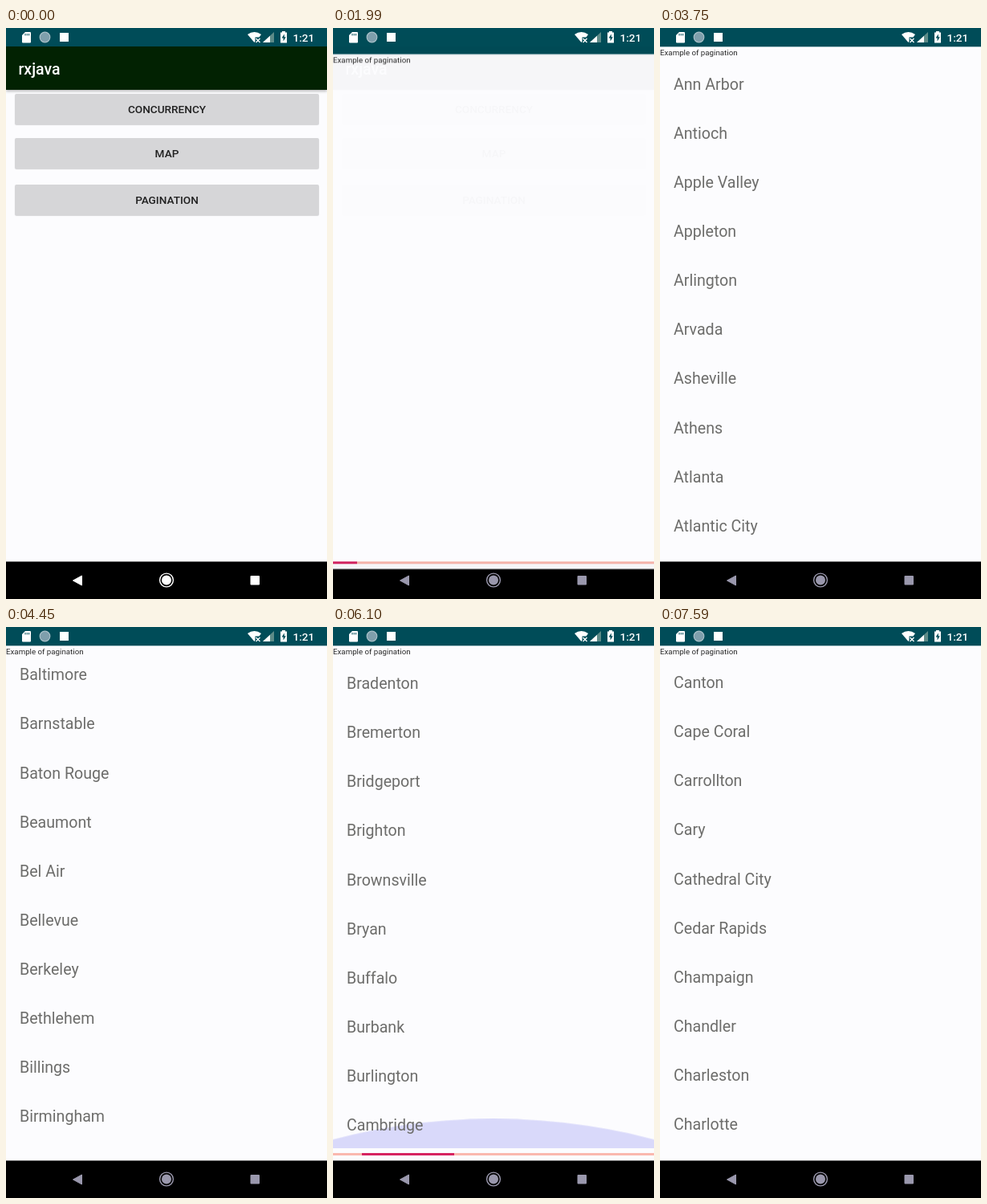
Recreate the animation shown at these times as an HTML page. Size 400x711 px, loop 8.47 s.

```html
<!DOCTYPE html>
<html lang="en">
<head>
<meta charset="utf-8">
<title>Pagination demo</title>
<style>
  html, body { margin: 0; width: 100%; height: 100%; overflow: hidden; background: #000; }
  body { font-family: Roboto, "Noto Sans", sans-serif; }
  .stage { position: relative; width: 400px; height: 711px; overflow: hidden; background: #000; }
  .stage div, .stage svg { position: absolute; }
  .page { left: 0; top: 0; width: 400px; height: 711px; background: #000; }
  .status { left: 0; top: 0; width: 400px; height: 23px; background: #004c58; }
  /* soft edges: the bars end between two pixels */
  .body { left: 0; top: 23px; width: 400px; height: 642px; background: #fcfcfe; overflow: hidden;
    box-shadow: inset 0 1px #a8c1c7, inset 0 -1px #707071; }

  .toolbar { left: 0; top: 23px; width: 400px; height: 54px; background: #022202; color: #fff;
    font: 500 19.5px/57px Roboto, sans-serif; text-indent: 15.5px; box-shadow: 0 2px 3px rgba(0,0,0,.25); }
  .btn { left: 11px; width: 379px; height: 38px; border-radius: 2px; background: #d6d6d8; color: #212121;
    font: 500 13.6px/39px Roboto, sans-serif; text-align: center; overflow: hidden;
    box-shadow: 0 1px 1px rgba(0,0,0,.16); }
  .ripple { left: -20px; top: -191px; width: 420px; height: 420px; border-radius: 50%;
    background: rgba(0,0,0,.13); transform: scale(0); animation: ripple 8.47s linear infinite; }

  .demo { opacity: 0; animation: rise 8.47s linear infinite, fade 8.47s linear infinite; }
  .label { left: 0; top: 2px; font-size: 9.73px; line-height: 11.4px; color: #2a2a2a; white-space: nowrap; }
  .view { left: 0; top: 13px; width: 400px; height: 613px; overflow: hidden;
    animation: load 8.47s step-end infinite; }
  .list { left: 17px; top: 3.6px; color: #6d6d6b; font-size: 19.6px; white-space: nowrap;
    animation: scroll 8.47s linear infinite; }
  .list div { position: static; height: 61.111px; line-height: 61.111px; }
  .glow { left: 0; top: 13px; overflow: hidden; }
  .glow ellipse { fill: #d5d5fa; fill-opacity: .9; transform-origin: 200px 613px; transform: scaleY(0);
    animation: glow 8.47s linear infinite; animation-delay: var(--at); }
  .track { left: 0; top: 632px; width: 400px; height: 3px; background: #fab8ae; overflow: hidden; opacity: 0;
    animation: show 8.47s step-end infinite; animation-delay: var(--at); }
  .track i { position: absolute; top: 0; height: 3px; background: #d62360;
    animation: sweep 8.47s linear infinite; animation-delay: var(--at); }

  .icons { left: 0; top: 0; }
  .nav { fill: #fff; stroke: #fff; animation: dim 8.47s step-end infinite; }
  .clock { font: 500 13.6px Roboto, sans-serif; }

  @keyframes ripple {
    0%, 19.36% { transform: scale(.05); opacity: 0; animation-timing-function: ease-out; }
    20.3% { opacity: 1; }
    22.9% { transform: scale(1); opacity: 1; }
    24.6%, 100% { transform: scale(1); opacity: 0; }
  }
  @keyframes rise {
    0%, 22.29% { transform: translateY(57px); animation-timing-function: cubic-bezier(.23,1,.32,1); }
    26.42%, 100% { transform: none; }
  }
  @keyframes fade {
    0%, 22.22% { opacity: 0; animation-timing-function: cubic-bezier(.215,.61,.355,1); }
    23.9%, 100% { opacity: 1; }
  }
  @keyframes load { 0% { visibility: hidden; } 27.42%, 100% { visibility: visible; } }
  @keyframes scroll {
    0%, 31.759% { transform: translateY(-2px); animation-timing-function: cubic-bezier(.4,.1,.7,.7); }
    35.419% { transform: translateY(-784.2px); animation-timing-function: cubic-bezier(.3,.45,.6,.9); }
    38.135%, 49.351% { transform: translateY(-1222.2px); animation-timing-function: cubic-bezier(.4,.1,.6,.85); }
    54.191%, 65.88% { transform: translateY(-2444.4px); animation-timing-function: cubic-bezier(.4,.1,.6,.85); }
    69.185%, 80.874% { transform: translateY(-3055.5px); animation-timing-function: cubic-bezier(.4,.1,.6,.85); }
    83.943%, 100% { transform: translateY(-3666.6px); }
  }
  @keyframes glow {
    0% { transform: scaleY(0); opacity: .5; }
    1.3% { transform: scaleY(.95); opacity: 1; }
    3.07% { transform: scaleY(1); opacity: 1; }
    3.542% { transform: scaleY(.68); opacity: .9; }
    5.667%, 100% { transform: scaleY(0); opacity: .4; }
  }
  @keyframes show { 0% { opacity: 1; } 5.19%, 100% { opacity: 0; } }
  @keyframes sweep {
    0% { left: -36px; width: 32px; }
    1.275% { left: -1px; width: 30px; }
    2.597% { left: 35px; width: 115px; }
    5.195%, 100% { left: 150px; width: 230px; }
  }
  @keyframes dim { 0% { fill: #fff; stroke: #fff; } 22.22%, 100% { fill: #9a98ad; stroke: #9a98ad; } }
</style>
</head>
<body>
<div class="stage">
  <div class="page">
    <div class="status"></div>
    <div class="body"></div>
    <div class="toolbar">rxjava</div>
    <div class="btn" style="top:82px">CONCURRENCY</div>
    <div class="btn" style="top:137px">MAP</div>
    <div class="btn" style="top:195px">PAGINATION<div class="ripple"></div></div>
  </div>

  <div class="page demo">
    <div class="status"></div>
    <div class="body">
      <div class="label">Example of pagination</div>
      <svg class="glow" id="glow" width="400" height="613"></svg>
      <div class="view"><div class="list" id="list"></div></div>
      <div id="bars"></div>
    </div>
  </div>

  <svg class="icons" width="400" height="711">
    <g fill="#fff">
      <path d="M24 5h6q1 0 1 1v11.500q0 1-1 1h-9q-1 0-1-1V9z"/>
      <path d="M24 7v2.500M26.300 7v2.500M28.600 7v2.500" stroke="#004c58"/>
      <circle cx="48.500" cy="11.500" r="6.300" fill="#7f9fac" stroke="#a9c0c8" stroke-width="1.200"/>
      <rect x="67" y="6" width="11" height="11"/>
      <path d="M301 8q8.500-6 17 0l-2.500 3.500h-5v5l-1 1.500z"/>
      <path d="M311.500 13l5 5m0-5l-5 5" stroke="#fff" stroke-width="1.400"/>
      <path d="M334 5v13h-14z" fill="#5d8b88"/>
      <path d="M329 9.700V18h-9z"/>
      <path d="M344 4h4v1.500h2V18.500h-8V5.500h2z"/>
      <path d="M346.800 7.500l-3.200 5h2v4l3.200-5.200h-2z" fill="#004c58"/>
      <text class="clock" x="357.500" y="17">1:21</text>
    </g>
    <g class="nav">
      <path d="M83.500 688l11-6v12z" stroke-width="1"/>
      <circle cx="200" cy="687.500" r="6" stroke="none"/>
      <circle cx="200" cy="687.500" r="8.400" fill="none" stroke-width="1.400"/>
      <rect x="304.500" y="682" width="11.500" height="11.500" rx="1" stroke="none"/>
    </g>
  </svg>
</div>
<script>
  const pages = [
    "Aberdeen,Abilene,Akron,Albany,Albuquerque,Alexandria,Allentown,Amarillo,Anaheim,Anchorage",
    "Ann Arbor,Antioch,Apple Valley,Appleton,Arlington,Arvada,Asheville,Athens,Atlanta,Atlantic City",
    "Augusta,Aurora,Austin,Bakersfield,Baltimore,Barnstable,Baton Rouge,Beaumont,Bel Air,Bellevue",
    "Berkeley,Bethlehem,Billings,Birmingham,Bloomington,Boise,Boise City,Bonita Springs,Boston,Boulder",
    "Bradenton,Bremerton,Bridgeport,Brighton,Brownsville,Bryan,Buffalo,Burbank,Burlington,Cambridge",
    "Canton,Cape Coral,Carrollton,Cary,Cathedral City,Cedar Rapids,Champaign,Chandler,Charleston,Charlotte"
  ];
  // The second page is loaded twice.
  const order = [0, 1, 1, 2, 3, 4, 5];
  const fill = (id, items, html) =>
    document.getElementById(id).innerHTML = items.map(html).join("");

  fill("list", order.flatMap(p => pages[p].split(",")), city => `<div>${city}</div>`);
  fill("glow", [3270, 4580, 5840, 7110], ms =>
    `<ellipse cx="200" cy="1031" rx="600" ry="455" style="--at:${ms}ms"/>`);
  fill("bars", [1882, 3090, 4580, 5880, 7150], ms =>
    `<div class="track" style="--at:${ms}ms"><i></i></div>`);
</script>
</body>
</html>
```
